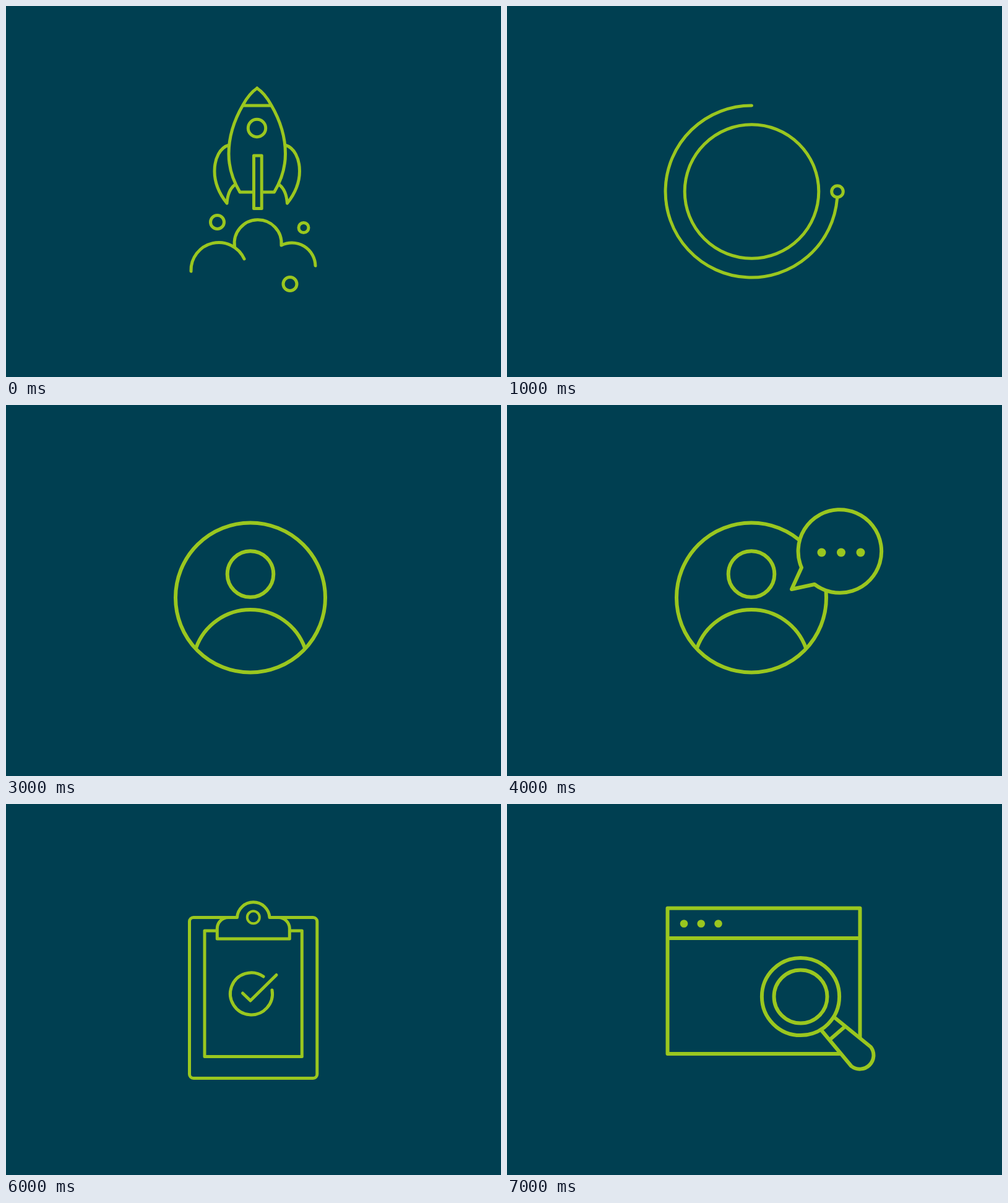
An HTML page for the animation above (8 s loop, 800 by 600 pixels).

```html
<!DOCTYPE html>
<html lang="en">
<head>
<meta charset="utf-8">
<title>Line icons</title>
<style>
  html, body { margin: 0; width: 100%; height: 100%; overflow: hidden; background: #003f51; }
  svg { display: block; width: 800px; height: 600px; }
  svg > g { visibility: hidden; fill: none; stroke: #9ac71f; stroke-width: 5; stroke-linecap: round; stroke-linejoin: round; }
  .bold { stroke-width: 6; }
  .solid { fill: #003f51; }
  .dot { fill: #9ac71f; stroke: none; }
</style>
</head>
<body>
<svg viewBox="0 0 800 600">
  <defs>
    <g id="side">
      <path d="M405.75 133C398 138 389 149 383 160C369 184 360 212 360 239C360 264 369 286 378 301H398"/>
      <path d="M360 225C346 229 337 246 337 267C337 288 345 304 357 319C358 305 362 295 370 289"/>
    </g>
    <g id="member">
      <circle cx="273.5" cy="228.5" r="32.5"/>
      <path d="M190.5 363A83 83 0 0 1 356.5 363Z"/>
    </g>
  </defs>

  <g id="rocket">
    <use href="#side"/>
    <use href="#side" transform="matrix(-1 0 0 1 811.5 0)"/>
    <path d="M383 161H428.5"/>
    <circle cx="405.5" cy="197.5" r="14.2"/>
    <rect x="400.5" y="242" width="12.7" height="85.5"/>
    <path d="M299 429A45 45 0 0 1 385 409M369.5 389A38 38 0 1 1 445 387A38 38 0 0 1 500 420"/>
    <circle cx="341.5" cy="349.5" r="11"/>
    <circle cx="481" cy="358.5" r="8"/>
    <circle cx="459" cy="449.5" r="11"/>
  </g>

  <g id="planet">
    <path d="M395.5 161A139 139 0 1 0 533.6 311"/>
    <circle cx="534" cy="300" r="9.3"/>
    <circle cx="395.5" cy="300" r="108.3"/>
  </g>

  <g id="surface">
    <path d="M315 229.5H380a26.5 26.5 0 0 1 0 53H289"/>
    <path d="M503 300H405a26.5 26.5 0 0 0 0 53H489"/>
    <path d="M292 328H344a26.5 26.5 0 0 1 0 53H326"/>
    <path d="M410 378H471"/>
    <circle class="dot" cx="431.5" cy="229.5" r="6.5"/>
    <circle cx="448.5" cy="261.5" r="17"/>
    <circle cx="342" cy="305.5" r="8"/>
  </g>

  <g id="person" class="bold">
    <circle cx="395" cy="311.5" r="121"/>
    <circle cx="395" cy="273.5" r="37.3"/>
    <path d="M307 393A93.5 93.5 0 0 1 483 393"/>
  </g>

  <g id="bubble" class="bold">
    <path class="solid" d="M476 263A67.3 67.3 0 1 1 497 290L460 298Z"/>
    <circle class="dot" cx="508.5" cy="238.5" r="7"/>
    <circle class="dot" cx="540" cy="238.5" r="7"/>
    <circle class="dot" cx="571.5" cy="238.5" r="7"/>
  </g>

  <g id="team" class="bold">
    <use href="#member"/>
    <use href="#member" x="252"/>
    <circle cx="399.8" cy="236.3" r="42.8"/>
    <path class="solid" d="M290 407A110 110 0 0 1 510 407Z"/>
  </g>

  <g id="clipboard">
    <rect x="296.5" y="183.5" width="206.3" height="260" rx="6.5"/>
    <rect x="321" y="205" width="157.3" height="203.5"/>
    <path class="solid" d="M341.3 218V201A18 18 0 0 1 359 183.5H373.5A26.3 26.3 0 0 1 426 183.5H440.5A18 18 0 0 1 458.3 201V218Z"/>
    <circle cx="399.8" cy="183.3" r="10" stroke-width="4"/>
    <path d="M416 279A34 34 0 1 0 430 301M382.5 306L395 318L437 276.5"/>
  </g>

  <g id="search" class="bold">
    <path d="M259.5 168.5H570.5V404H259.5ZM259.5 217H570.5"/>
    <circle class="dot" cx="286" cy="193.5" r="6.3"/>
    <circle class="dot" cx="313.7" cy="193.5" r="6.3"/>
    <circle class="dot" cx="341.5" cy="193.5" r="6.3"/>
    <path class="solid" d="M509 367L556.5 424A22.3 22.3 0 0 0 588 393L529 345"/>
    <path d="M523 380L545 361"/>
    <circle class="solid" cx="474.5" cy="311.5" r="62.6"/>
    <circle cx="474.5" cy="311.5" r="43"/>
  </g>
</svg>
<script>
  const STEP = 1000;
  const steps = [
    ["rocket"],
    ["planet"],
    ["planet", "surface"],
    ["person"],
    ["person", "bubble"],
    ["team"],
    ["clipboard"],
    ["search"]
  ];
  const icons = document.querySelectorAll("svg > g");
  const start = performance.now();
  let shown = -1;

  function draw(now) {
    const i = Math.floor(Math.max(0, now - start) / STEP) % steps.length;
    if (i !== shown) {
      shown = i;
      for (const icon of icons) {
        icon.style.visibility = steps[i].includes(icon.id) ? "visible" : "hidden";
      }
    }
    requestAnimationFrame(draw);
  }
  draw(start);
</script>
</body>
</html>
```
